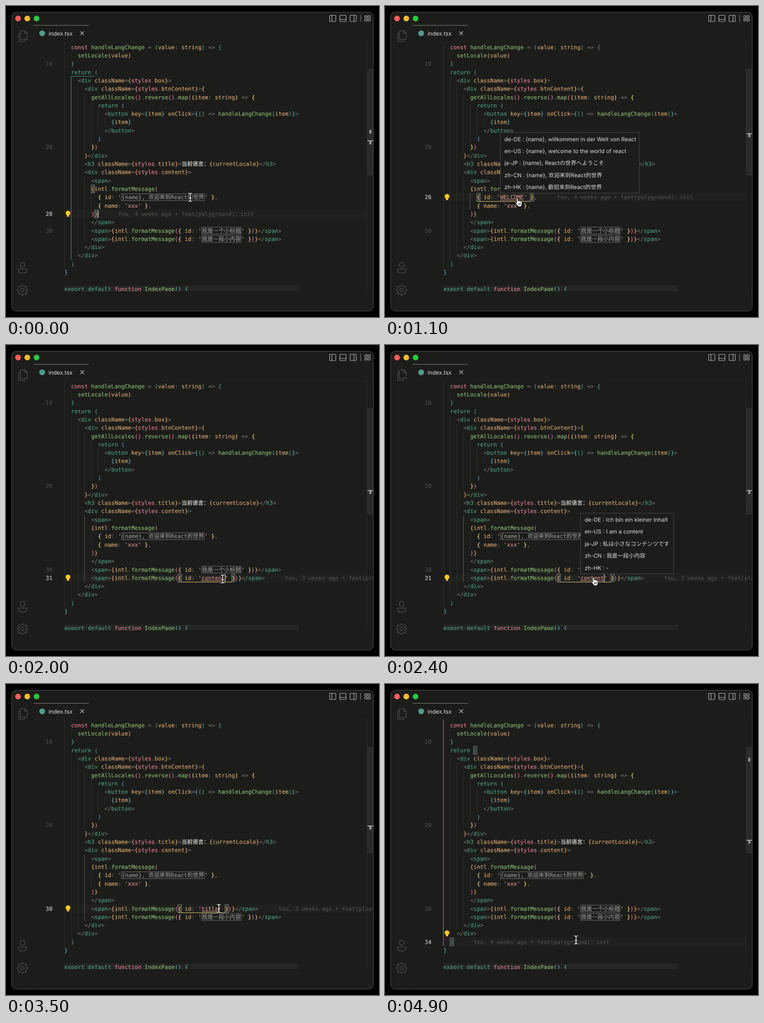
These frames come from a looping animation (820 px wide and 683 px high, 5 s). An HTML page:

```html
<!DOCTYPE html>
<html lang="zh-CN">
<head>
<meta charset="utf-8">
<title>Editor demo</title>
<style>
  html, body { margin: 0; width: 100%; height: 100%; overflow: hidden; background: #000; }
  svg { display: block; width: 820px; height: 683px; }
  text { white-space: pre; text-rendering: geometricPrecision; }
  .code { font: 12.21px "DejaVu Sans Mono", "Noto Sans CJK SC", "Noto Sans CJK", monospace; }
  .code, .code tspan { fill: currentColor; stroke: currentColor; stroke-width: 0.2; }
  .ui { font: 12.2px Inter, "Noto Sans CJK SC", "Noto Sans CJK", sans-serif; fill: #dededa; }
  .line { fill: none; stroke-linecap: round; stroke-linejoin: round; }
</style>
</head>
<body>
<svg viewBox="0 0 820 683">
  <defs><clipPath id="pane"><rect x="62" y="78" width="745" height="548"/></clipPath></defs>
  <rect width="820" height="683"/>
  <rect x="12.5" y="13.5" width="795" height="656.5" rx="10" fill="#1c1d1b" stroke="#545552"/>
  <path d="M61.5 42V669M62 78.5H807" stroke="#212220"/>
  <path d="M61 42.5H182" stroke="#858682"/>
  <circle cx="26.5" cy="27.5" r="6.2" fill="#ff5f57"/>
  <circle cx="46.8" cy="27.5" r="6.2" fill="#febc2e"/>
  <circle cx="67.2" cy="27.5" r="6.2" fill="#28c840"/>
  <g class="line" stroke="#b9bab6" stroke-width="1.2">
    <rect x="711.5" y="20.5" width="13.5" height="13.5" rx="1"/><path d="M716.5 21V34"/>
    <rect x="734" y="20.5" width="13.5" height="13.5" rx="1"/><path d="M734 29.5H747"/>
    <rect x="756.5" y="20.5" width="13.5" height="13.5" rx="1"/><path d="M765 21V34"/>
    <path d="M779.5 19.5V35" stroke="#777874"/>
    <path d="M789 21.5h4.5v4.5h-4.5zM796 21.5h4.5v4.5h-4.5zM789 28.5h4.5v4.5h-4.5zM796 28.5h4.5v4.5h-4.5z"/>
  </g>
  <circle cx="79.5" cy="60" r="6.3" fill="#4f9d8c"/>
  <text class="ui" x="93.5" y="64.5" style="font-size:12.5px">index.tsx</text>
  <path class="line" d="M163.8 56l7.6 7.6m0-7.6l-7.6 7.6" stroke="#d0d0cb" stroke-width="1.1"/>
  <g class="line" stroke="#474946" stroke-width="1.6">
    <path d="M33 54.5h8.5l5 5v12.2q0 1.5-1.5 1.5H33q-1.5 0-1.5-1.5V56q0-1.5 1.5-1.5zM41 55v5h5.5M31 59.5h-1.5q-1.5 0-1.5 1.5v15q0 1.5 1.5 1.5H40q1.5 0 1.5-1.5v-2.5"/>
    <circle cx="36.5" cy="568.5" r="5.2"/>
    <path d="M29 577.5h15q2 0 2 2c0 5-4 7.3-9.5 7.3s-9.5-2.3-9.5-7.3q0-2 2-2z"/>
    <path id="gear"/><circle cx="36.3" cy="624" r="3.6"/>
  </g>
  <g id="editor" clip-path="url(#pane)"></g>
  <g id="pointer"></g>
</svg>
<script>
const FONT = 12.21, CHAR = FONT * 0.60205, ROW = 18.31;
const BRACKETS = ['#5eaab5', '#4a9a7a', '#dfa56c', '#dc759c', '#f0d480', '#6394bf'];
const GREEN = '#4a9a7a', PINK = '#e07c92', LEAF = '#85b36c', TAN = '#d3a26b', GREY = '#6b6c69', STRING = '#d48f86';

const colX = c => 128.4 + c * CHAR;
const midY = n => 90.4 + (n - 8) * ROW;
const topY = n => midY(n) - ROW / 2;
const rulerY = n => 280 + (n - 26) * 7.85;
const esc = s => s.replace(/&/g, '&amp;').replace(/</g, '&lt;');
const rect = (x, y, w, h, attrs) => `<rect x="${x}" y="${y}" width="${w}" height="${h}" ${attrs}/>`;
const path = (d, stroke, attrs = '') => `<path d="${d}" fill="none" stroke="${stroke}" ${attrs}/>`;
const text = (x, n, body, color, attrs = '') =>
  `<text class="code" x="${x}" y="${midY(n) + 4.3}" color="${color}" ${attrs}>${body}</text>`;

const FIRST = 8;
const source = `  const handleLangChange = (value: string) => {
    setLocale(value)
  }
  return (
    <div className={styles.box}>
      <div className={styles.btnContent}>{
        getAllLocales().reverse().map((item: string) => {
          return (
            <button key={item} onClick={() => handleLangChange(item)}>
              {item}
            </button>
          )
        })
      }</div>
      <h3 className={styles.title}>当前语言：{currentLocale}</h3>
      <div className={styles.content}>
        <span>
        {intl.formatMessage(
          { id: '@' },
          { name: 'xxx' },
        )}
        </span>
        <span>{intl.formatMessage({ id: '@' })}</span>
        <span>{intl.formatMessage({ id: '@' })}</span>
      </div>
    </div>
  )
}

export default function IndexPage() {`.split('\n');

const messages = {
  26: { key: 'WELCOME', label: '{name}, 欢迎来到React的世界', width: 305.5,
    tips: ['{name}, willkommen in der Welt von React', '{name}, welcome to the world of react',
      '{name}, Reactの世界へようこそ', '{name}, 欢迎来到React的世界', '{name}, 歡迎來到React的世界'] },
  30: { key: 'title', label: '我是一个小标题', width: 180.5,
    tips: ['Ich bin ein Untertitel', 'I am a title', '私は字幕です', '我是一个小标题', '我是一個小標題'] },
  31: { key: 'content', label: '我是一段小内容', width: 204.5,
    tips: ['Ich bin ein kleiner Inhalt', 'I am a content', '私は小さなコンテンツです', '我是一段小内容', '-'] }
};
const LOCALES = ['de-DE', 'en-US', 'ja-JP', 'zh-CN', 'zh-HK'];

// Indent guides: column, first line, last line
const guides = [[0, 7, 34], [2, 9, 9], [2, 12, 33], [4, 13, 32], [6, 14, 20], [6, 24, 31],
  [8, 15, 19], [8, 26, 27], [10, 16, 18], [12, 17, 17]];

// boxes: matched brackets; pair: depth, column, first line, last line, end column
const onLast = { line: 34, weeks: 4, boxes: [[11, 9], [34, 2]], ruler: [11, 34], pair: [0, 0, 7, 34, 0] };
const onTitle = { line: 30, weeks: 3, boxes: [[30, 34], [30, 48]], ruler: [30], pair: [4, 34, 31, 30, 48], indent: [6, 24, 31] };
const states = [
  { t: 0, line: 28, weeks: 4, boxes: [[25, 8], [28, 9]], ruler: [25, 28], pair: [1, 2, 12, 33, 9], caret: 10 },
  { t: 200, line: 26, weeks: 4, boxes: [[26, 10], [26, 26]], ruler: [26], pair: [4, 10, 27, 26, 26], indent: [8, 26, 27] },
  { t: 1400, line: 27, weeks: 4, boxes: [[25, 27], [28, 8]], ruler: [], pair: [3, 8, 26, 27, 27] },
  { t: 1900, line: 31, weeks: 3, boxes: [[31, 34], [31, 50]], ruler: [31], pair: [4, 34, 32, 31, 50], indent: [6, 24, 31], caret: 48 },
  { t: 3000, ...onLast },
  { t: 3400, ...onTitle },
  { t: 4500, ...onLast, pair: null },
  { t: 4800, ...onLast }
];
// Hover: hand from, until, tooltip from
const hovers = [[600, 1200, 700], [2100, 2800, 2300], [3700, 4300, 3800]];
const track = [[0, 405, 420], [100, 402, 420], [600, 296, 429], [800, 293, 431], [1100, 293, 431],
  [1400, 370, 440], [1600, 428, 489], [1900, 482, 512], [2200, 460, 519], [2600, 460, 519],
  [3000, 424, 563], [3200, 424, 563], [3400, 468, 494], [3500, 468, 493], [3800, 455, 504],
  [4200, 455, 504], [4600, 420, 562], [5000, 420, 562]];

let depth = 1;
function bracketColor(ch) {
  if (')}'.includes(ch)) depth--;
  const color = BRACKETS[depth % 6];
  if ('({'.includes(ch)) depth++;
  return color;
}

function tokenColor(token, next) {
  if (/^[(){}]$/.test(token)) return bracketColor(token);
  if (/^(const|function|styles)$/.test(token)) return PINK;
  if (/^(return|export|default|div|button|span|h3)$/.test(token)) return GREEN;
  if (token === 'handleLangChange' || (/^\w/.test(token) && next === '(')) return LEAF;
  if (/^\w/.test(token)) return TAN;
  if (token[0] === "'") return STRING;
  return token > '\u3000' ? '#e3e3de' : GREY;
}

const paint = src => src.replace(/'\w+'|\w+|[\u3000-\uffef]+|\s+|./g, (token, at) =>
  `<tspan color="${tokenColor(token, src[at + token.length])}">${esc(token)}</tspan>`);

const labelWidth = s => [...s].reduce((w, ch) => w + (ch > '\u2e80' ? FONT : CHAR), 2);

function codeLine(raw, n, active) {
  const message = messages[n];
  const src = message && active ? raw.replace('@', message.key) : raw;
  const indent = src.search(/\S|$/);
  const [before, after] = src.trim().split('@');
  let out = text(colX(indent), n, paint(before), GREY);
  if (after) {
    const x = colX(indent + before.length), w = labelWidth(message.label);
    out += rect(x + 0.5, midY(n) - 7.5, w - 1, 15, 'fill="none" stroke="#747571"')
      + text(x + 1, n, message.label, '#92938f')
      + text(x + w, n, paint(after), GREY);
  } else if (message) {
    const x = colX(raw.indexOf('@'));
    out += path(`M${x} ${midY(n) + 6.2}h${message.key.length * CHAR}`, STRING);
  }
  return out;
}

function tooltip(n) {
  const { tips, width } = messages[n];
  const x = colX(source[n - FIRST].indexOf('@')) + 0.3, y = topY(n) - 133;
  return rect(x, y, width, 133, 'fill="#1c1d1b" stroke="#4b4c49"') + tips.map((tip, i) =>
    `<text class="ui" x="${x + 8.8}" y="${y + 18.7 + i * 26.4}" lang="${LOCALES[i]}">${LOCALES[i]} : ${tip}</text>`).join('');
}

function bulb(n) {
  const y = midY(n) - 2;
  return `<circle cx="136.3" cy="${y}" r="5.2" fill="#ffca28"/>` + rect(133.9, y + 3, 4.8, 5.2, 'rx="1" fill="#ffca28"');
}

const vertical = ([col, from, to]) => `M${colX(col)} ${topY(from)}V${topY(to + 1)}`;

function editor(t) {
  const s = states.filter(state => state.t <= t).pop();
  let out = rect(128, topY(s.line), 665, ROW, 'fill="#20211f"')
    + rect(128, 614, 516, 12, 'fill="#252624"')
    + path(guides.map(vertical).join(''), '#30312f');
  if (s.indent) out += path(vertical(s.indent), '#5f605d');
  if (s.pair) {
    const [level, col, from, to, end] = s.pair;
    out += path(`M${colX(end)} ${topY(from)}H${colX(col)}V${topY(to + 1)}`, BRACKETS[level]);
  }
  for (const [n, col] of s.boxes) {
    out += rect(colX(col), topY(n) + 0.5, CHAR, ROW - 1, 'fill="#2b2c2a" stroke="#8b8c87"');
  }
  depth = 1;
  source.forEach((raw, i) => {
    const n = i + FIRST, active = n === s.line;
    out += codeLine(raw, n, active);
    if (active || n % 10 === 0) out += text(102, n, n, active ? '#cfcfc9' : '#4b4c4a', 'text-anchor="end"');
  });
  const raw = source[s.line - FIRST], message = messages[s.line];
  const length = raw.length + (message ? message.key.length - 1 : 0);
  const scope = s.weeks === 4 ? 'palyground' : 'playground';
  out += text(colX(length + 6), s.line, `You, ${s.weeks} weeks ago • feat(${scope})：init`, '#4d4e4b');
  if (s.caret) out += rect(colX(s.caret), topY(s.line) + 1, 1.4, ROW - 2, 'fill="#d0d0ca"');
  out += bulb(s.line === 34 ? 33 : s.line);

  out += rect(793, 138, 14, 234, 'fill="#2b2c2a"') + path('M793.5 78V626', '#292a28')
    + s.ruler.map(n => rect(798.8, rulerY(n), 4.4, 8, 'fill="#9b9c98"')).join('')
    + rect(794.5, rulerY(s.line) - 0.5, 12.5, 1.8, 'fill="#b5b6b2"');
  if (hovers.some(([, end, show]) => t >= show && t < end)) out += tooltip(s.line);
  return out;
}

function pointer(t) {
  const i = track.findIndex(([time]) => time > t);
  const [t0, x0, y0] = track[i - 1], [t1, x1, y1] = track[i];
  const k = (t - t0) / (t1 - t0), e = k * k * (3 - 2 * k);
  const hand = hovers.some(([from, to]) => t >= from && t < to);
  const beam = 'M-4-9Q0-9 0-6Q0-9 4-9M0-7V7M-4 9Q0 9 0 6Q0 9 4 9M-2.5 1.5H2.5';
  const shape = hand
    ? '<path d="M-3.5 2V-7q0-1.7 1.5-1.7T-.4-7v5q.2-1.6 1.6-1.6t1.5 1.7q.3-1.2 1.5-1.2T5.6-1.4q.2-.9 1.1-.9 1.3 0 1.3 1.7V4q0 2-1.2 3.4V9.3H-1V8Q-2.8 6.5-5.7 1.9q-1.1-1.9.2-2.2 1-.2 2 2.3zM.5 2V6M2.7 2V6M4.9 2V6" fill="#fff" stroke="#111" stroke-linejoin="round"/>'
    : path(beam, '#0b0b0b', 'stroke-width="3.8"') + path(beam, '#fff', 'stroke-width="1.6"');
  return `<g transform="translate(${x0 + (x1 - x0) * e} ${y0 + (y1 - y0) * e})">${shape}</g>`;
}

const byId = id => document.getElementById(id);
byId('gear').setAttribute('d', 'M' + Array.from({ length: 32 }, (_, i) => {
  const a = (i - 0.5) * Math.PI / 16, r = i % 4 < 2 ? 11.6 : 8.8;
  return `${(36.3 + r * Math.cos(a)).toFixed(2)} ${(624 + r * Math.sin(a)).toFixed(2)}`;
}).join('L') + 'Z');

let shown = -1;
function render(now) {
  const t = Math.floor(now % 5000 / 100) * 100;
  if (t !== shown) {
    shown = t;
    byId('editor').innerHTML = editor(t);
    byId('pointer').innerHTML = pointer(t);
  }
  requestAnimationFrame(() => render(performance.now()));
}
render(performance.now());
</script>
</body>
</html>
```
